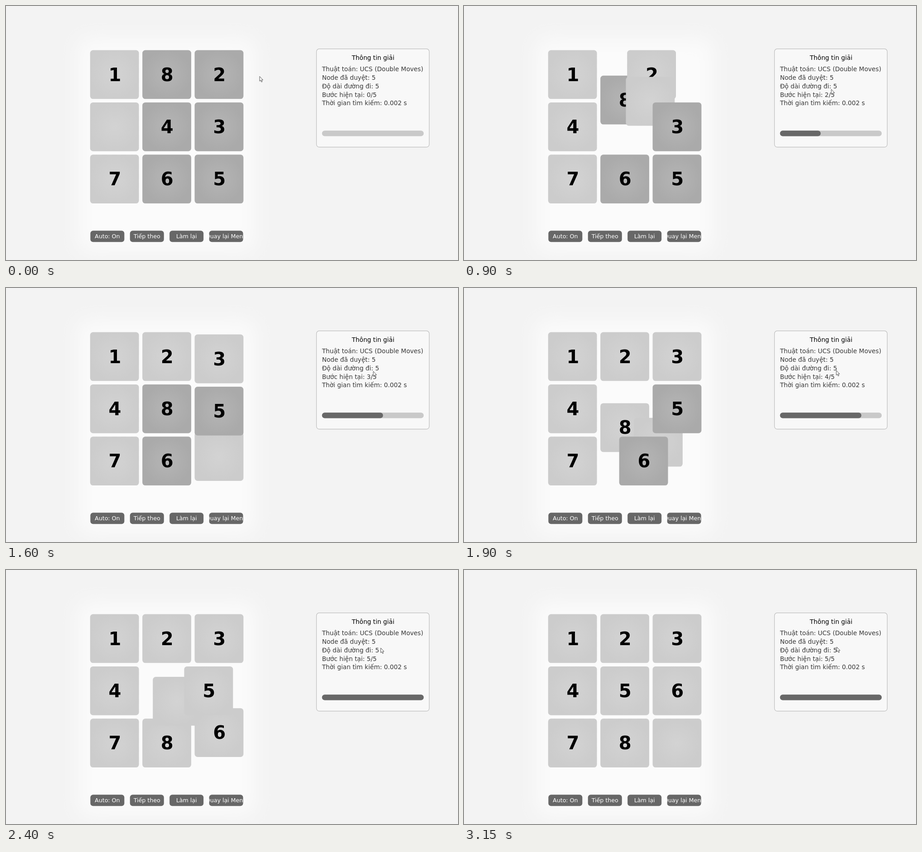
Recreate the animation shown at these times as an HTML page. Size 998 by 561 pixels, loop 3300 ms.

```html
<!DOCTYPE html>
<html lang="vi">
<head>
<meta charset="utf-8">
<title>8-puzzle</title>
<style>
  html, body { margin: 0; width: 100%; height: 100%; overflow: hidden; background: #f3f3f3; }
  svg { display: block; width: 998px; height: 561px; font-family: "DejaVu Sans", sans-serif; }
  .digit { font-size: 40px; font-weight: bold; text-anchor: middle; }
  .title { font-size: 13.7px; text-anchor: middle; }
  .info { font-size: 13.7px; fill: #383838; }
  .button { font-size: 12.6px; fill: #fff; text-anchor: middle; }
</style>
</head>
<body>
<svg viewBox="0 0 998 561">
  <defs>
    <filter id="soft" x="-30%" y="-30%" width="160%" height="160%"><feGaussianBlur stdDeviation="22"/></filter>
    <radialGradient id="light"><stop stop-color="#d3d3d3"/><stop offset="1" stop-color="#cccccc"/></radialGradient>
    <radialGradient id="dark"><stop stop-color="#b5b5b5"/><stop offset="1" stop-color="#aaaaaa"/></radialGradient>
  </defs>
  <rect width="998" height="561" fill="#f3f3f3"/>
  <rect x="160" y="72" width="390" height="470" rx="20" fill="#fbfbfb" filter="url(#soft)"/>
  <g id="board"></g>
  <g id="buttons"></g>
  <rect x="685.5" y="94.7" width="249" height="217" rx="6" fill="#f8f8f8" stroke="#bebebe" stroke-width="1.2"/>
  <text class="title" x="810.5" y="119.3">Thông tin giải</text>
  <g id="info"></g>
  <rect x="697.7" y="275.2" width="224.6" height="12.4" rx="6" fill="#c9c9c9"/>
  <rect id="bar" x="697.7" y="275.2" height="12.4" rx="6" fill="#686868"/>
  <path id="cursor" d="M0 0V10.6L2.4 8.4L4 12.4L5.9 11.6L4.2 7.8H7.4Z" fill="#fafafa" stroke="#555" stroke-width="1"/>
</svg>
<script>
const LOOP = 3300, FRAME = 50, TICK = 1000 / 60;
const PITCH = 115.4, LEFT = 185.7, TOP = 97.5, SIZE = 107.8;
const GOAL = "123456780";
const states = ["182043765", "182403765", "120483765", "123485760", "123405786", GOAL];
const starts = [0, 341.7, 841.7, 1358.3, 1858.3, 2375];
// time, x, y of the pointer
const pointer = [
  [0, 560, 155.5], [200, 984, 12], [350, 984, 12], [850, 811, 184], [1600, 811, 184],
  [1750, 822, 182], [2200, 822, 182], [2450, 828, 171], [2900, 828, 171], [3100, 823, 170], [LOOP, 823, 170]
];
const byId = id => document.getElementById(id);

function add(parent, tag, attrs, text = "") {
  const node = document.createElementNS("http://www.w3.org/2000/svg", tag);
  for (const name in attrs) node.setAttribute(name, attrs[name]);
  node.textContent = text;
  return parent.appendChild(node);
}

const tiles = [...states[0]].map(digit => {
  const group = add(byId("board"), "g", {});
  const face = add(group, "rect", { width: SIZE, height: SIZE, rx: 6.5 });
  if (digit !== "0") add(group, "text", { class: "digit", x: SIZE / 2 + 0.8, y: 68 }, digit);
  return { digit, group, face };
});

["Auto: On", "Tiếp theo", "Làm lại", "Quay lại Menu"].forEach((label, i) => {
  const x = 186.3 + i * 87.4;
  add(byId("buttons"), "rect", { x, y: 496.2, width: 75, height: 25, rx: 6, fill: "#676767" });
  add(byId("buttons"), "text", { class: "button", x: x + 37.5, y: 513.3 }, label);
});

const lines = ["Thuật toán: UCS (Double Moves)", "Node đã duyệt: 5", "Độ dài đường đi: 5",
  "Bước hiện tại: 0/5", "Thời gian tìm kiếm: 0.002 s"
].map((text, i) => add(byId("info"), "text", { class: "info", x: 697.7, y: 144.4 + i * 18.72 }, text));

const mix = (a, b, k) => a + (b - a) * k;

function cell(state, digit) {
  const i = state.indexOf(digit);
  return [LEFT + (i % 3) * PITCH, TOP + Math.floor(i / 3) * PITCH];
}

function pointerAt(t) {
  const i = pointer.findIndex(p => p[0] > t);
  const [t0, x0, y0] = pointer[i - 1], [t1, x1, y1] = pointer[i];
  const u = (t - t0) / (t1 - t0), k = u * u * (3 - 2 * u);
  return [mix(x0, x1, k), mix(y0, y1, k)];
}

function draw(t) {
  const step = starts.filter(s => s <= t).length - 1;
  const state = states[step], before = states[Math.max(0, step - 1)];
  // each tick closes a fifth of the remaining distance
  const k = 1 - 0.8 ** Math.floor((t - starts[step]) / TICK);
  for (const { digit, group, face } of tiles) {
    const [x0, y0] = cell(before, digit), [x1, y1] = cell(state, digit);
    const placed = digit === "0" || state.indexOf(digit) === GOAL.indexOf(digit);
    group.setAttribute("transform", `translate(${mix(x0, x1, k)} ${mix(y0, y1, k)})`);
    face.setAttribute("fill", placed ? "url(#light)" : "url(#dark)");
  }
  lines[3].textContent = `Bước hiện tại: ${step}/5`;
  byId("bar").setAttribute("width", 224.6 * step / 5);
  byId("cursor").setAttribute("transform", `translate(${pointerAt(t)})`);
}

const origin = performance.now();
function tick() {
  const t = (performance.now() - origin) % LOOP;
  draw(Math.floor(t / FRAME) * FRAME);
  requestAnimationFrame(tick);
}
tick();
</script>
</body>
</html>
```
